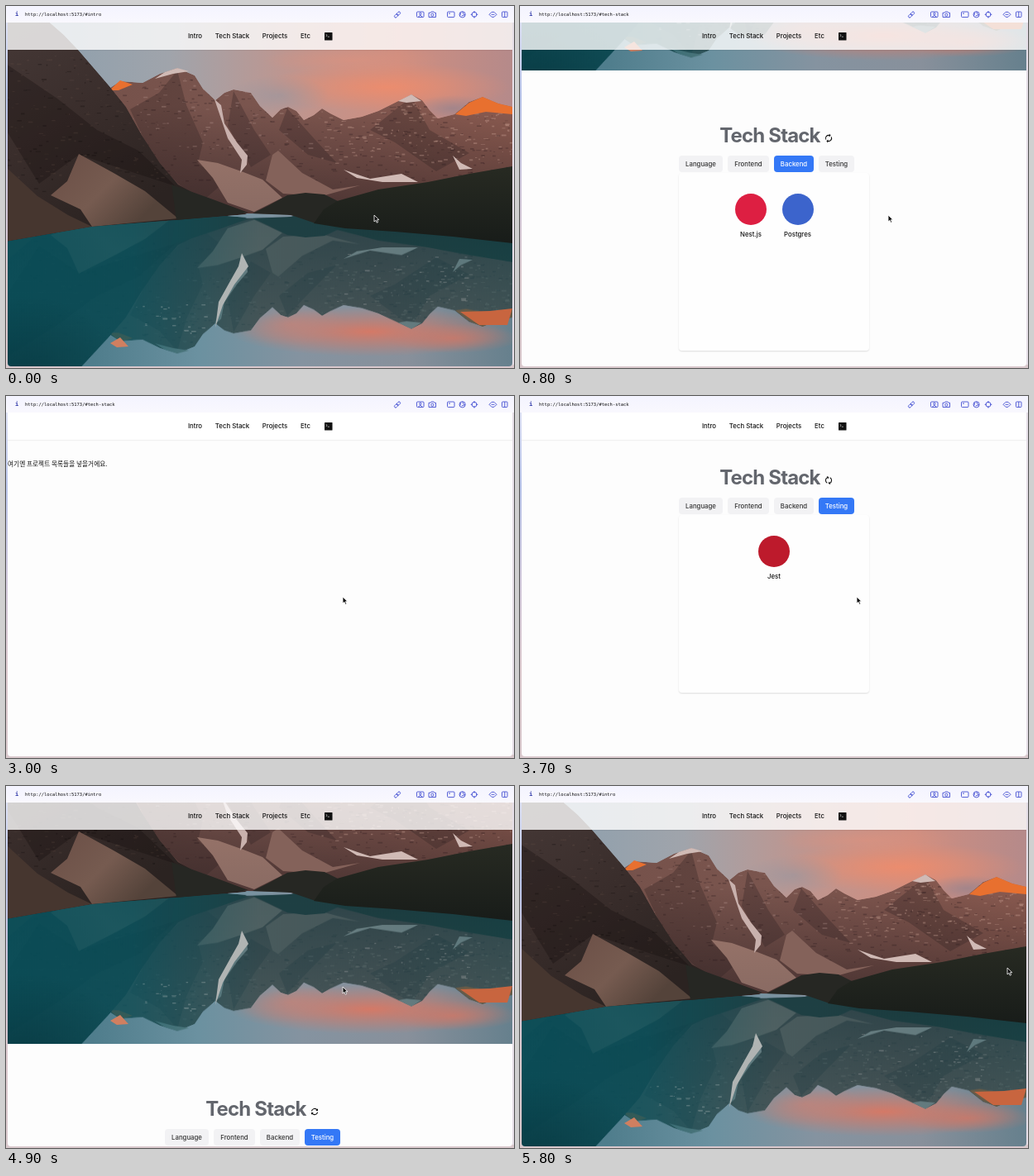
An HTML page with a canvas for the animation above (5.9 s loop, 614 by 438 pixels).

```html
<!DOCTYPE html>
<html lang="en">
<head>
<meta charset="utf-8">
<title>Portfolio scroll</title>
<style>
html, body { margin: 0; width: 100%; height: 100%; overflow: hidden; }
body { position: relative; background: linear-gradient(#e6e8f8, #b8c4ea 25%, #d0c8dc 50%, #dcc9ce 75%, #d9c8cc);
  font: 500 7.8px/1 Inter, "Open Sans", sans-serif; color: #111; }
body::after { content: ""; position: absolute; left: 612px; top: 20px; width: 2px; height: 414px; background: #e6dfe8; }
div, svg, canvas { position: absolute; }
#bar { left: 0; top: 0; width: 614px; height: 20px; background: linear-gradient(#f4f4ff, #f9f8fe); }
#url { left: 23px; top: 7.5px; font: 5.48px/1 "DejaVu Sans Mono", monospace; white-space: pre; }
#info { left: 11px; top: 6.5px; font: bold 7px/1 "DejaVu Sans Mono", monospace; color: #3038a8; }
#view { left: 2px; top: 20px; width: 610px; height: 415.5px; overflow: hidden; background: #fdfdfd; border-radius: 0 0 4px 4px; }
#page { left: -2px; top: -20px; width: 614px; height: 1268px; will-change: transform; }
#nav { left: 0; top: 0; width: 610px; height: 33px; background: rgba(255,255,255,.8); box-shadow: 0 1px 1px rgba(0,0,0,.05); }
.label { transform: translate(-50%, -50%); white-space: nowrap; }
.title { font-size: 24px; font-weight: 700; letter-spacing: -.035em; color: #63666d; }
.tab { height: 20px; border-radius: 4px; background: #f2f2f4; text-align: center; line-height: 20px; color: #333; }
.tab.on { background: #3478f6; color: #fff; }
#card { left: 192px; top: 560px; width: 230px; height: 215px; border-radius: 4px; background: #fefefe; box-shadow: 0 1px 2px rgba(0,0,0,.13); }
.mark { width: 38px; height: 38px; border-radius: 50%; transform: translate(-50%, -50%); }
#note { left: 2px; top: 854px; font: 500 7.7px/1 "Noto Sans CJK KR", "Noto Sans CJK", sans-serif; white-space: nowrap; }
</style>
</head>
<body>
<div id="view">
  <div id="page">
    <canvas id="photo" width="614" height="436"></canvas>
    <div id="card"></div>
    <svg id="spin" style="left:367px;top:512px" width="12" height="12" viewBox="-6 -6 12 12">
      <g fill="none" stroke="#111" stroke-width="1.1">
        <path d="M-3.6-.6A3.7 3.7 0 0 1 3-2.1M3.6.6A3.7 3.7 0 0 1-3 2.1"/>
        <path d="M4-3.8V-1H1.2ZM-4 3.8V1H-1.2Z" fill="#111" stroke="none"/>
      </g>
    </svg>
    <div id="note">여기엔 프로젝트 목록들을 넣을거에요.</div>
  </div>
  <div id="nav"></div>
</div>
<div id="bar">
  <div id="info">i</div>
  <div id="url"></div>
  <svg width="614" height="20" fill="none" stroke="#4450d2" stroke-width=".9">
    <g transform="rotate(-45 473 10.5)"><rect x="468.6" y="9" width="4.8" height="3" rx="1.5"/><rect x="472.6" y="9" width="4.8" height="3" rx="1.5"/></g>
    <rect x="496.5" y="7" width="8.5" height="6.5" rx="1"/><circle cx="500.8" cy="9.4" r="1.2"/><path d="M498.6 13Q500.8 9.8 503 13"/>
    <path d="M511 8.2H513L514 7H517L518 8.2H519.5V13.5H511Z"/><circle cx="515.3" cy="10.7" r="1.6"/>
    <rect x="533.5" y="7" width="8.5" height="6.5" rx="1"/><path d="M535 9H537"/>
    <circle cx="551.6" cy="10.3" r="3.6"/><path d="M551.6 6.8L553.5 10.5M555 10.5L550.6 12M548.4 12L550 8.2"/>
    <circle cx="566" cy="10.3" r="3"/><path d="M566 6V8.5M566 12V14.6M561.7 10.3H564M568 10.3H570.3"/>
    <path d="M584 10.3L587 7.3H590L593 10.3L590 13.3H587ZM586.5 10.3H590.5"/>
    <rect x="599.5" y="7" width="6.5" height="6.5" rx=".8"/><path d="M602.8 7V13.5"/>
  </svg>
</div>
<svg style="left:385px;top:32px" width="9.5" height="9.5" viewBox="0 0 9.5 9.5">
  <rect width="9.5" height="9.5" rx=".6" fill="#111"/>
  <path d="M1.6 2.2L3.2 3.6L1.6 5M3.8 5.2H5.8" fill="none" stroke="#ddd" stroke-width=".7"/>
</svg>
<svg id="cursor" style="left:0;top:0" width="10" height="12" viewBox="-1 -1 10 12">
  <path d="M0 0V8L1.9 6.3L3.2 9.2L4.6 8.6L3.4 5.7H5.9Z" fill="#111" stroke="#fff" stroke-width=".8"/>
</svg>
<script>
const $ = id => document.getElementById(id);
const LOOP = 5900, STEP = 100, SECTION = 416, GLIDE = 700;

function add(parent, cls, text, x, y, css = {}) {
  const el = document.createElement('div');
  el.className = cls;
  el.textContent = text;
  Object.assign(el.style, { left: x + 'px', top: y + 'px' }, css);
  parent.append(el);
  return el;
}

// Static page content
const page = $('page');
[['Intro', 228.5], ['Tech Stack', 273.5], ['Projects', 325], ['Etc', 362]]
  .forEach(([name, x]) => add(document.body, 'label', name, x, 37));
add(page, 'label title', 'Tech Stack', 302, 515);

const tabs = [['Language', 192, 53], ['Frontend', 251, 50], ['Backend', 307, 48], ['Testing', 361, 43]]
  .map(([name, x, w]) => add(page, 'tab', name, x, 539, { width: w + 'px' }));

function tool(name, x, color) {
  return [add(page, 'mark', '', x, 604, { background: color }), add(page, 'label', name, x, 635)];
}
const panels = {
  2: [...tool('Nest.js', 279, '#dd1f42'), ...tool('Postgres', 335.5, '#3c64cc')],
  3: tool('Jest', 307, '#bd1a2c')
};

// Drawing helpers for the lake photo
function brush(c) {
  let seed = 7;
  const rnd = () => (seed = seed * 16807 % 2147483647) / 2147483647;
  return {
    shape(fill, d) { c.fillStyle = fill; c.fill(new Path2D(d)); },
    ramp(x0, y0, x1, y1, ...colors) {
      const g = c.createLinearGradient(x0, y0, x1, y1);
      colors.forEach((col, i) => g.addColorStop(i / (colors.length - 1), col));
      return g;
    },
    glow(x, y, rx, ry, rgb, a) {
      c.save();
      c.translate(x, y);
      c.scale(rx, ry);
      const g = c.createRadialGradient(0, 0, 0, 0, 0, 1);
      g.addColorStop(0, `rgba(${rgb},${a})`);
      g.addColorStop(1, `rgba(${rgb},0)`);
      c.fillStyle = g;
      c.fillRect(-1, -1, 2, 2);
      c.restore();
    },
    flecks(n, x, y, w, h, fill) {
      c.fillStyle = fill;
      for (let i = 0; i < n; i++) c.fillRect(x + rnd() * w, y + rnd() * h, 1 + rnd() * 5, .6 + rnd() * 1.4);
    }
  };
}

function paintLand(c) {
  const { shape, ramp, flecks } = brush(c);

  // Far range
  const range = 'M120 103L138 91L165 93L186 82L207 75L228 84L238 100L253 114L264 105L275 101L296 105L307 121L322 135L332 125L341 122L351 127L360 138L372 132L382 124L392 130L408 138L430 134L450 127L470 117L490 107L503 114L512 126L522 136L542 131L560 116L576 110L595 118L612 122V262H380L340 252L290 251L150 245Z';
  c.save();
  c.clip(new Path2D(range));
  shape(ramp(130, 0, 612, 0, '#76524b', '#7a554e', '#80564e', '#8d5c51'), range);
  shape('rgba(45,30,32,.3)', 'M207 78L218 120L238 165L232 190L262 215L235 238L180 190L150 125L185 105Z M275 103L300 150L320 180L296 195L268 145Z M490 110L512 150L560 178L520 200L470 165L440 150Z M340 124L372 160L400 190L365 180L330 150Z');
  shape(ramp(0, 120, 0, 235, 'rgba(45,32,34,0)', 'rgba(45,32,34,.55)'), 'M100 100H612V262H100Z');
  flecks(420, 125, 85, 490, 130, 'rgba(40,26,28,.3)');
  flecks(190, 380, 115, 232, 75, 'rgba(205,165,152,.35)');
  flecks(100, 140, 85, 240, 90, 'rgba(190,155,148,.3)');
  c.restore();
  shape('#e8702f', 'M543 131L560 117L576 110L595 118L612 122V131L580 128L556 133Z M125 102L138 90L153 95L136 102Z');
  shape('#d0bab5', 'M180 88L192 80L207 75L221 79L202 82Z M474 115L490 107L502 115L484 117Z M540 181L550 190L564 197L548 198Z M408 198L425 204L440 209L478 203L498 213L455 213L424 208Z');

  // Scree and snow gully
  shape(ramp(0, 185, 0, 248, '#957268', '#8a6b63'), 'M231 186L256 190L287 201L310 210L334 232L300 249L268 238L250 208Z');
  shape('#84625a', 'M314 211L322 180L329 175L358 202L395 222L428 217L382 230L335 227Z');
  shape('#c9b1ad', 'M252 113L260 120L264 142L279 165L292 181L291 192L283 202L285 186L268 160Z');

  // Near slope
  const slope = 'M0 0H30L70 35L88 54L125 97L145 122L164 156L186 190L208 216L245 236L292 252L206 259L104 267L0 285Z';
  c.save();
  c.clip(new Path2D(slope));
  shape(ramp(20, 30, 150, 250, '#443735', '#392d2b', '#2b2321'), slope);
  shape('rgba(18,13,13,.3)', 'M0 70L62 112L110 150L160 175L205 218L88 180L40 215L0 150Z');
  flecks(160, 0, 60, 200, 150, 'rgba(120,92,82,.16)');
  flecks(120, 0, 60, 200, 170, 'rgba(10,6,6,.25)');
  shape('#46362f', 'M0 195L38 230L75 253L104 267L0 285Z');
  shape(ramp(80, 180, 160, 260, '#6d5148', '#765b50', '#54433a'), 'M88 179L130 202L168 224L208 257L104 267L90 246L54 229L74 212Z');
  c.restore();

  // Forest
  shape('#262723', 'M200 216L250 234L293 250L250 255L206 259Z M298 251L318 241L340 229L362 226L385 228L405 238L374 263L345 253Z');
  shape(ramp(0, 195, 0, 288, '#272a22', '#181c19'), 'M612 194L560 203L510 213L450 222L400 236L384 246L372 263L410 269L470 273L540 279L612 287Z');
}

function paintPhoto() {
  const c = $('photo').getContext('2d');
  const { shape, ramp, glow, flecks } = brush(c);

  // Sky
  c.fillStyle = ramp(60, 0, 612, 0, '#8fa0ad', '#a0a4ab', '#bd9690', '#cf8e80', '#b58a8a');
  c.fillRect(0, 0, 614, 260);
  glow(460, 98, 150, 30, '238,140,108', .9);
  glow(420, 66, 110, 18, '222,146,126', .6);
  glow(330, 108, 60, 24, '150,150,160', .6);
  glow(540, 124, 50, 16, '150,130,140', .7);

  // Sky mirrored in the lake
  c.fillStyle = ramp(105, 0, 612, 0, '#4f7d8c', '#6b91a0', '#8593a0', '#88909b', '#66808d');
  c.fillRect(0, 250, 614, 186);
  glow(440, 394, 170, 30, '216,120,100', .95);
  glow(540, 402, 80, 18, '205,120,104', .8);
  glow(345, 385, 70, 26, '200,130,118', .6);

  // Land and its teal reflection
  const layer = document.createElement('canvas');
  layer.width = 614;
  layer.height = 436;
  const lc = layer.getContext('2d'), tint = brush(lc);
  paintLand(lc);
  const land = document.createElement('canvas');
  land.width = 614;
  land.height = 436;
  land.getContext('2d').drawImage(layer, 0, 0);

  lc.globalCompositeOperation = 'source-atop';
  lc.fillStyle = tint.ramp(0, 0, 614, 0, 'rgba(5,82,94,.86)', 'rgba(8,86,98,.8)', 'rgba(24,84,94,.55)', 'rgba(24,78,88,.58)', 'rgba(18,78,88,.62)');
  lc.fillRect(0, 0, 614, 436);
  tint.glow(20, 40, 130, 110, '6,48,56', .6);

  const MIRROR = .93, AXIS = 254;
  c.save();
  c.beginPath();
  c.rect(0, 250, 614, 186);
  c.clip();
  c.translate(0, AXIS * (1 + MIRROR));
  c.scale(1, -MIRROR);
  c.drawImage(layer, 0, 0);
  c.restore();

  shape('#b0b4b3', 'M285 299L293 315L276 337L262 362L253 389L257 358L272 331L281 315Z');
  shape('#c8653f', 'M549 370L585 369L612 366L606 386L572 386Z');
  shape('#d07f60', 'M126 408L138 401L148 412L134 413Z');
  flecks(45, 400, 300, 170, 62, 'rgba(175,175,175,.3)');
  flecks(25, 150, 360, 90, 36, 'rgba(170,180,182,.35)');
  c.drawImage(land, 0, 0);
}

// CSS ease-in-out, solved by bisection
function ease(x) {
  if (x <= 0) return 0;
  if (x >= 1) return 1;
  let lo = 0, hi = 1, u = .5;
  for (let i = 0; i < 24; i++) {
    u = (lo + hi) / 2;
    const v = 1 - u;
    if (1.26 * u * v * v + 1.74 * u * u * v + u * u * u < x) lo = u; else hi = u;
  }
  return u * u * (3 - 2 * u);
}

const glides = [[282, 1, 'tech-stack'], [1331, 1, 'projects'], [2822, -1, 'tech-stack'], [4465, -1, 'intro']];
const moves = [[0, 445, 253], [900, 445, 253], [1300, 451, 267], [2050, 451, 267], [2750, 407, 243], [5200, 407, 243], [5700, 589, 220], [LOOP, 589, 220]];

function pointer(t) {
  const i = moves.findIndex(m => m[0] > t);
  const [t0, x0, y0] = moves[i - 1], [t1, x1, y1] = moves[i];
  const k = ease((t - t0) / (t1 - t0));
  return [x0 + (x1 - x0) * k, y0 + (y1 - y0) * k];
}

function render(t) {
  let scroll = 0, hash = 'intro';
  for (const [start, dir, name] of glides) {
    scroll += dir * SECTION * ease((t - start) / GLIDE);
    if (t >= start) hash = name;
  }
  page.style.transform = `translateY(${-Math.round(scroll)}px)`;
  $('url').textContent = 'http://localhost:5173/#' + hash;
  $('spin').style.transform = `rotate(${(t - 4900) * .36}deg)`;

  const active = t >= 2600 && t < 5600 ? 3 : 2;
  tabs.forEach((tab, i) => tab.classList.toggle('on', i === active));
  for (const key in panels)
    panels[key].forEach(el => { el.style.display = +key === active ? '' : 'none'; });

  const [x, y] = pointer(t);
  $('cursor').style.transform = `translate(${x - 1}px, ${y - 1}px)`;
}

function tick() {
  const t = performance.now() % LOOP;
  render(Math.floor(t / STEP) * STEP);
  requestAnimationFrame(tick);
}

paintPhoto();
tick();
</script>
</body>
</html>
```
